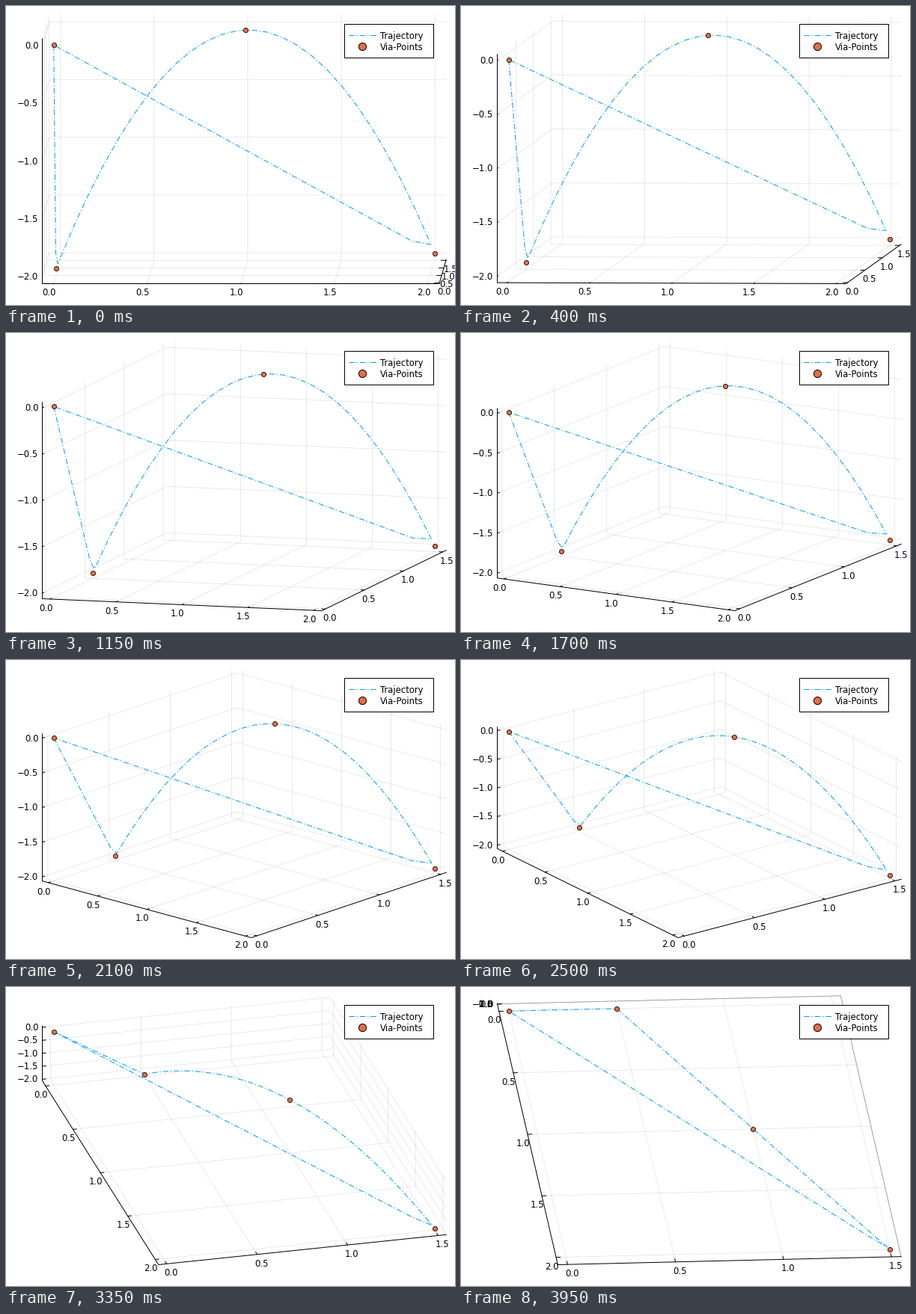
Recreate the animation shown at these times as a matplotlib script. Size 600x400 px, loop 4.5 s.

```python
import numpy as np
import matplotlib.pyplot as plt
from matplotlib.animation import FuncAnimation
from matplotlib.patches import Rectangle

W, H, DPI = 600, 400, 100
PX = 72 / DPI
FRAMES, POSES = 90, 80
LEFT, RIGHT, TOP, BOTTOM = 48.5, 588.2, 11.8, 371.5
BLUE, ORANGE = "#009afa", "#e26f46"
DASHES = (7.4, 2.8, 1.4, 2.8)
TICK = 0.012

LO = np.array([-0.06, -0.045, -2.06])
HI = np.array([2.06, 1.545, 0.06])
TICKS = [np.arange(0, 2.1, 0.5), np.arange(0, 1.6, 0.5), np.arange(-2, 0.1, 0.5)]
VIA = np.array([(0, 0, 0), (0, 0.5, -2), (1, 1, 0), (2, 1.5, -2)], float)


def path_point(t):
    """Closed route: straight down, parabolic arc, straight back."""
    if t < 1:
        return VIA[1] * t
    if t < 3:
        x = t - 1
        return np.array([x, 0.5 + x / 2, -2 * (1 - x) ** 2])
    return VIA[3] * (4 - t)


times = np.concatenate([[0], 1.01 + 0.0788 * np.arange(-12, 38), [4]])
ROUTE = np.array([path_point(t) for t in times])


def unit(points):
    return (np.asarray(points, float) - LO) / (HI - LO)


def project(p, turn, tilt):
    """Map unit-cube points to pixels, stretched to fill the plot area."""
    r, t = np.radians([turn, tilt])
    c, s = np.cos(r), np.sin(r)
    rise, up = np.tan(t / 2), np.cos(t)
    p = np.asarray(p, float)
    x, y, z = p[..., 0], p[..., 1], p[..., 2]
    u = (x * c + y * s) / (c + s)
    v = (z * up + rise * ((1 - x) * s * s + y * c * c)) / (rise + up)
    return LEFT + u * (RIGHT - LEFT), BOTTOM - v * (BOTTOM - TOP)


fig = plt.figure(figsize=(W / DPI, H / DPI), dpi=DPI, facecolor="white")
ax = fig.add_axes([0, 0, 1, 1])
ax.set(xlim=(0, W), ylim=(H, 0))
ax.axis("off")
plt.rcParams["font.family"] = "DejaVu Sans"

moving = []


def add_line(points, z, **style):
    style.setdefault("color", "black")
    style.setdefault("lw", PX)
    line, = ax.plot([], [], zorder=z, snap=False, **style)
    moving.append((line, np.asarray(points, float)))


def add_text(x, y, s, **style):
    return ax.text(x, y, s, fontsize=11.6 * PX, zorder=3, **style)


labels = []


def add_label(point, s, dx, dy, ha):
    text = add_text(0, 0, s, ha=ha, va="center", clip_on=True)
    labels.append((text, np.array(point, float), dx, dy))


def tick_parts(axis, q):
    """Grid polyline and tick mark for one tick at unit position q."""
    if axis == 0:
        return [(q, 0, 0), (q, 1, 0), (q, 1, 1)], [(q, 0, 0), (q, TICK, 0)]
    if axis == 1:
        return [(1, q, 0), (0, q, 0), (0, q, 1)], [(1, q, 0), (1 - TICK, q, 0)]
    return [(0, 0, q), (0, 1, q), (1, 1, q)], [(0, 0, q), (0, TICK, q)]


for axis, values in enumerate(TICKS):
    for value in values:
        q = (value - LO[axis]) / (HI[axis] - LO[axis])
        grid, mark = tick_parts(axis, q)
        add_line(grid, 1, alpha=0.1, lw=0.8 * PX)
        add_line(mark, 2)
        name = f"{value:.1f}".replace("-", "\u2212")
        if axis == 2:
            add_label(mark[0], name, None, 0.5, "right")
        else:
            add_label(mark[0], name, (-5.9, 5.9)[axis], 12.4, "center")

add_line([(0, 0, 1), (0, 0, 0), (1, 0, 0), (1, 1, 0)], 2)
add_line(unit(ROUTE), 4, color=BLUE, dashes=DASHES, dash_capstyle="butt")
add_line(unit(VIA), 5, ls="none", marker="o", ms=6.2 * PX, mfc=ORANGE,
         mec="black", mew=0.8 * PX)

# Legend
ax.add_patch(Rectangle((452, 24), 118.5, 45.2, fc="white", ec="black",
                       lw=PX, zorder=6))
ax.plot([457.7, 494.5], [39.3, 39.3], color=BLUE, lw=PX, dashes=DASHES,
        dash_capstyle="butt", zorder=7)
ax.plot([476], [54.3], "o", ms=10.2 * PX, mfc=ORANGE, mec="black",
        mew=PX, zorder=7)
for y, s in ((43.6, "Trajectory"), (58.6, "Via-Points")):
    add_text(500, y, s, va="baseline").set_zorder(7)


def draw(i):
    k = min(i, POSES - 1)
    turn, tilt = k + 1, k + 11
    for line, points in moving:
        line.set_data(*project(points, turn, tilt))
    for text, point, dx, dy in labels:
        x, y = project(point, turn, tilt)
        text.set_position((43.3 if dx is None else x + dx, y + dy))
    return [m[0] for m in moving] + [t[0] for t in labels]


anim = FuncAnimation(fig, draw, frames=FRAMES, interval=50, repeat=True,
                     repeat_delay=0, init_func=lambda: draw(0))
plt.show()
```
